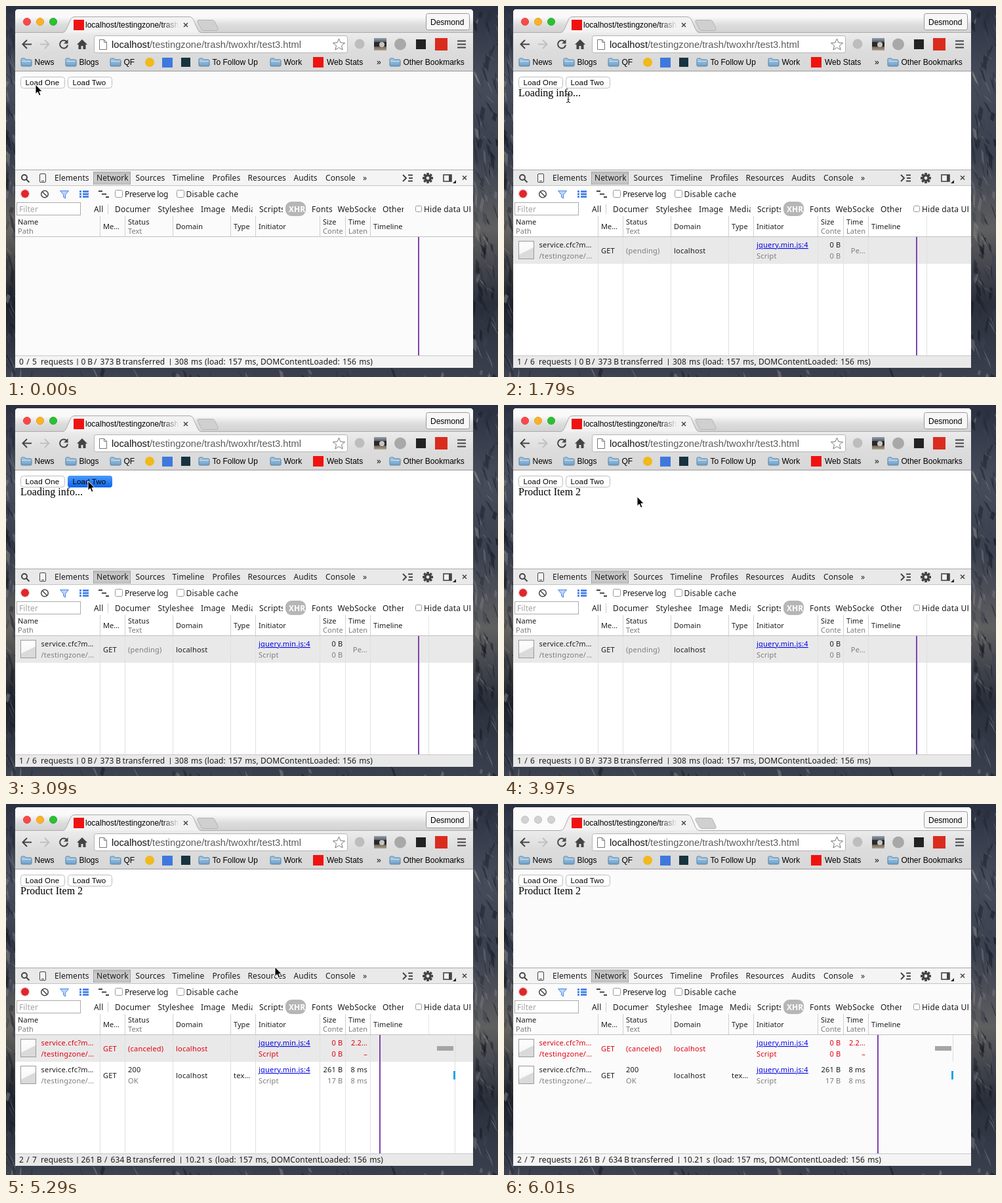
Recreate the animation shown at these times as an HTML page. Size 750x567 px, loop 6.11 s.

```html
<!DOCTYPE html>
<html lang="en">
<head>
<meta charset="utf-8">
<title>Network panel</title>
<style>
html, body { margin: 0; width: 100%; height: 100%; overflow: hidden; background: #2c313d; }
svg { display: block; }
#stage { width: 750px; height: 567px; --page: #fff; --bar: #e9e9e9; }
#stage.pale { --page: #fbfbfb; --bar: #f4f4f4; }
.page { fill: var(--page); }
.bar { fill: var(--bar); }
.title { fill: url(#title); }
.pale .vivid { display: none; }
.idle .title { fill: #fbfbfb; }
.idle .light { fill: #d2d2d2; stroke: #b9b9b9; }
text { white-space: pre; fill: #1c1c1c; }
.ui { font: 12px "Liberation Sans", Arial, sans-serif; fill: #000; }
.url { font: 14.7px "Liberation Sans", Arial, sans-serif; fill: #5c5c5c; }
.btn { font: 11.6px "Liberation Sans", Arial, sans-serif; letter-spacing: .1px; fill: #000; }
.body { font: 16px "Liberation Serif", Times, serif; fill: #000; }
.tool { font: 12px "Noto Sans", sans-serif; letter-spacing: .08px; }
.filter { font: 12px "Noto Sans", sans-serif; letter-spacing: .2px; }
.tight { letter-spacing: -.32px; }
.wide { letter-spacing: .2px; }
.hint { fill: #a4a4a4; }
.chosen { fill: #fff; font-weight: 600; }
.stat { font: 12px "Noto Sans", sans-serif; letter-spacing: .1px; word-spacing: 1px; }
.stat.close { word-spacing: -.4px; }
.cell { font: 11px "Noto Sans", sans-serif; letter-spacing: .22px; }
.head { font: 11px "Noto Sans", sans-serif; letter-spacing: .05px; }
.dim { fill: #7c7c7c; }
.red text { fill: #e0000f; }
text.link { fill: #0000e6; text-decoration: underline; }
.end { text-anchor: end; }
.line { fill: none; stroke: #444; stroke-width: 2; }
.thin { stroke-width: 1.5; }
.faint { stroke: #c0c0c0; }
</style>
</head>
<body>
<svg id="stage" viewBox="0 0 750 567" xmlns="http://www.w3.org/2000/svg"></svg>
<script>
const text = (x, y, s, cls) => `<text x="${x}" y="${y}" class="${cls}">${s}</text>`;
const rect = (x, y, w, h, fill, more = '') =>
  `<rect x="${x}" y="${y}" width="${w}" height="${h}" fill="${fill}" ${more}/>`;
const area = (x, y, w, h, cls) => `<rect x="${x}" y="${y}" width="${w}" height="${h}" class="${cls}"/>`;
const circle = (x, y, r, fill, more = '') => `<circle cx="${x}" cy="${y}" r="${r}" fill="${fill}" ${more}/>`;
const shape = (d, fill, stroke = 'none') => `<path d="${d}" fill="${fill}" stroke="${stroke}"/>`;
const line = (d, cls = '') => `<path d="${d}" class="line ${cls}"/>`;
const clipped = (x, y, w, s, cls) =>
  `<svg x="${x}" y="${y - 14}" width="${w}" height="20">${text(0, 14, s, cls)}</svg>`;
const group = (id, inner, cls = '') => `<g id="${id}" class="${cls}">${inner}</g>`;
const fade = (id, ...colors) => `<linearGradient id="${id}" x2="0" y2="1">${colors.map((c, i) =>
  `<stop offset="${i / (colors.length - 1)}" stop-color="${c}"/>`).join('')}</linearGradient>`;

const defs = `<defs>
  ${fade('leftRock', '#2a3040', '#4a505e', '#343a49', '#66645f', '#1d212b', '#3d4350')}
  ${fade('rightRock', '#2a3040', '#464c5a', '#3a404e', '#5f5f60', '#2a2f3b', '#3a404d')}
  ${fade('title', '#fbfbfb', '#f8f8f8', '#dcdcdc', '#d2d2d2')}
  ${fade('toolbar', '#ebebeb', '#dcdcdc', '#d8d8d8')}
  ${fade('folder', '#a9cdea', '#6f9fc8')}
  ${fade('pressed', '#4b9cfb', '#0b63ea')}
  ${fade('photo', '#8fa0b4', '#3c3a37', '#b0a490')}
  ${fade('sheet', '#fff', '#f2f2f2')}
  ${fade('tab', '#b4b4b4', '#cacaca', '#cdcdcd', '#bcbcbc')}
  <linearGradient id="fadeOut"><stop stop-color="#f2f2f2" stop-opacity="0"/><stop offset="1" stop-color="#f2f2f2"/></linearGradient>
</defs>`;

// Rocky wallpaper: soft gradients with seeded facets along the visible edges.
function wallpaper() {
  let seed = 11;
  const rnd = n => (seed = (seed * 16807) % 2147483647) / 2147483647 * n;
  const tones = ['#0f131b', '#181d28', '#262c3a', '#3b4150', '#757a86', '#8c8a86'];
  let out = rect(0, 0, 375, 567, 'url(#leftRock)') + rect(375, 0, 375, 567, 'url(#rightRock)');
  for (let i = 0; i < 320; i++) {
    const side = i % 6;
    const x = side < 2 ? rnd(18) - 5 : side < 5 ? 708 + rnd(42) : rnd(750);
    const y = side < 5 ? rnd(567) : 552 + rnd(14);
    const w = 1 + rnd(5), h = 6 + rnd(18), lean = rnd(14) - 4;
    const tone = tones[Math.floor(rnd(tones.length))];
    out += `<g opacity=".5">${shape(`M${x} ${y}l${w} ${h * .3}l${lean} ${h}l${-w} ${-h * .4}z`, tone)}</g>`;
  }
  return out;
}

const folder = x => shape(`M${x} 81.5q0-1.5 1.5-1.5h4l1.5 2h7.5q1.5 0 1.5 1.5v7q0 1.5-1.5 1.5h-13q-1.5 0-1.5-1.5z`,
  'url(#folder)', '#55809f') + rect(x + 1, 84, 14, 1, '#c9e0f2');

function browser() {
  const lights = [[32, '#fb4948', '#d93a38'], [52, '#fdb225', '#dc951d'], [72, '#29c231', '#1ea126']]
    .map(([x, f, s]) => circle(x, 24, 5.6, f, `class="light" stroke="${s}" stroke-width=".8"`)).join('');
  const marks = [[23, 'News'], [91, 'Blogs'], [159, 'QF'], [294, 'To Follow Up'], [403, 'Work'], [585, 'Other Bookmarks']]
    .map(([x, s]) => folder(x) + text(x + 20.5, 90, s, 'ui')).join('');
  return `<path class="page" d="M14 553V10q0-5 5-5H707q5 0 5 5V553z"/>`
    + '<path class="title" d="M14 41V10q0-5 5-5H707q5 0 5 5V41z"/>'
    + lights
    + rect(14, 41, 698, 58, 'url(#toolbar)')
    + shape('M14 40.5H86q4 0 6-5l6-14q2-5 7-5H279q5 0 7 5l6 14q2 5 6 5H712', '#f2f2f2', '#aaa')
    + rect(89, 40, 206, 2, '#eee')
    + shape('M294 21.5h20q3 0 4 2l5 11q1 3-2 3h-19q-3 0-4-2l-6-11q-1-3 2-3z', '#d0d0d0', '#b4b4b4')
    + rect(103, 21, 16, 16, '#ee1310')
    + clipped(121, 33, 143, 'localhost/testingzone/trash', 'ui') + rect(238, 20, 26, 18, 'url(#fadeOut)')
    + line('M271 26l6 6m0-6l-6 6', 'thin')
    + rect(640.5, 11.5, 66, 25, '#f7f7f7', 'rx="3" stroke="#999"')
    + text(647, 29, 'Desmond', 'ui')
    + line('M39 58.5H25m7-6.5l-6.5 6.5l6.5 6.5')
    + line('M52 58.5H66m-7-6.5l6.5 6.5l-6.5 6.5', 'faint')
    + line('M92.5 54.5a6 6 0 1 0 1.5 5') + shape('M94.5 51v6.5h-6.5z', '#444')
    + shape('M108 59l8-8l8 8h-2.5v7h-4v-5h-3v5h-4v-7z', '#444')
    + rect(134.5, 45.5, 386, 26, '#fff', 'rx="3" stroke="#b4b4b4"')
    + shape('M142.5 51.5h7l4 4v11h-11zM149.5 51.5v4h4', '#fff', '#777')
    + text(161, 64, '<tspan fill="#111">localhost</tspan>/testingzone/trash/twoxhr/test3.html', 'url')
    + shape('M507.5 50l2.5 6l6.500.5l-5 4.2l1.6 6.3l-5.6-3.5l-5.6 3.5l1.6-6.3l-5-4.2l6.5-.5z', '#fff', '#777')
    + circle(539, 58, 7.5, '#bdbdbd')
    + rect(561, 49, 19, 19, 'url(#photo)') + rect(561, 55, 19, 7, '#29292b') + circle(573, 59, 4, '#c9c3ba')
    + circle(601, 58.5, 9, '#a8a8a8')
    + rect(625, 51, 15, 15, '#222')
    + rect(654, 49, 19, 19, '#d92c1f')
    + line('M688 53.5h13m-13 5h13m-13 5h13')
    + marks
    + circle(219, 86, 7, '#f0b91c')
    + rect(238, 79, 16, 15, '#3f78dd')
    + rect(267, 79, 14, 14, '#173340')
    + rect(468, 78, 16, 16, '#ee1310') + text(489, 90, 'Web Stats', 'ui')
    + text(565, 90, '»', 'ui')
    + area(14, 99, 698, 454, 'page') + rect(14, 99, 698, 1, '#999');
}

const button = (x, label, id) =>
  rect(x + .5, 108.5, 67, 17, '#fff', 'rx="4" stroke="#bdbdbd"')
  + group(id, rect(x, 108, 68, 18, 'url(#pressed)', 'rx="4"'))
  + text(x + 7.5, 121, label, 'btn');

const checkbox = (x, y, size) => rect(x + .5, y + .5, size, size, '#fff', 'rx="2" stroke="#999"');

const columns = [143, 181, 254, 342, 380, 478, 517, 555];

function devtools() {
  const tabs = [[74, 'Elements'], [138, 'Network'], [197.5, 'Sources'], [253.5, 'Timeline'], [314.5, 'Profiles'],
    [368.5, 'Resources'], [438.5, 'Audits'], [487, 'Console'], [544, '»']];
  const filters = [[134, 20, 'All'], [166, 54, 'Document'], [231.5, 54, 'Stylesheets'], [297, 37, 'Images'],
    [344, 32, 'Media'], [386, 36, 'Scripts'], [466, 31, 'Fonts'], [505.5, 58, 'WebSockets'], [574, 32, 'Other'],
    [637, 71, 'Hide data URLs']];
  const gear = Array.from({ length: 8 }, (_, i) =>
    rect(641.4, 255, 3.2, 16, '#444', `transform="rotate(${i * 45} 643 263)"`)).join('');
  return area(14, 250, 698, 25, 'bar') + rect(14, 250, 698, 1, '#a8a8a8') + rect(14, 274, 698, 1, '#c4c4c4')
    + rect(133, 253, 57, 20, 'url(#tab)') + rect(133, 253, 1, 20, '#a0a0a0') + rect(189, 253, 1, 20, '#a0a0a0')
    + tabs.map(([x, s]) => text(x, 267, s, 'tool')).join('')
    + circle(28, 262, 4, 'none', 'class="line"') + line('M31 265l4.5 4.5')
    + rect(51.5, 256.5, 9, 13, '#f4f4f4', 'rx="1.5" stroke="#444"') + rect(54, 267, 4, 1, '#444')
    + line('M605 258l5 5l-5 5m8-9.5h7m-6 4.5h6m-7 4.5h7')
    + gear + circle(643, 263, 5.8, '#444') + circle(643, 263, 2.4, '#e9e9e9')
    + rect(667, 258, 12, 10, '#f4f4f4', 'stroke="#444" stroke-width="1.6"') + rect(675, 258, 4, 10, '#444')
    + shape('M686 266v5h-5z', '#222')
    + line('M696 259.5l6 6m0-6l-6 6', 'thin')
    + circle(29, 287, 6, '#e0262b') + circle(29, 287, 6.6, 'none', 'stroke="#efa5a5" stroke-width=".7"')
    + circle(59, 287.5, 5.3, 'none', 'class="line thin"') + line('M55.5 284l7 7', 'thin')
    + shape('M82.5 282.5h13l-5 6v5.5l-3-2v-3.5z', '#b9d4fa', '#4b86e8')
    + [282, 286, 290].map(y => rect(112, y, 3, 3, '#4b86e8') + rect(117, y, 9, 3, '#4b86e8')).join('')
    + line('M141 283h6m-1 4.5h7m-1 4.5h5')
    + checkbox(166, 281, 11) + text(181, 292, 'Preserve log', 'tool tight')
    + checkbox(260, 281, 11) + text(274.5, 292, 'Disable cache', 'tool wide')
    + rect(16.5, 300.5, 97, 19, '#fff', 'stroke="#aaa"') + text(20, 315, 'Filter', 'tool hint')
    + rect(155, 303, 1, 15, '#ccc')
    + rect(426, 299, 31, 22, '#b6b6b6', 'rx="9"')
    + clipped(431, 315, 25, 'XHR', 'tool chosen')
    + checkbox(624, 305, 9)
    + filters.map(([x, w, s]) => clipped(x, 315, w, s, 'filter')).join('')
    + columns.map(x => rect(x, 321, 1, 31, '#d0d0d0')).join('')
    + `<g class="vivid">${rect(644, 321, 1, 31, '#e4e4e4')}</g>`
    + rect(14, 352, 698, 1, '#c0c0c0')
    + [[18, 'Name', 'Path'], [186, 'Status', 'Text'], [483, 'Size', 'Content'], [522, 'Time', 'Latency']]
      .map(([x, a, b]) => clipped(x, 334, 34, a, 'head') + clipped(x, 348, 30, b, 'head dim')).join('')
    + [[148, 'Me…'], [259, 'Domain'], [347, 'Type'], [385, 'Initiator'], [560, 'Timeline']]
      .map(([x, s]) => text(x, 341, s, 'head')).join('')
    + group('stripe', rect(14, 353, 698, 41, '#e9e9e9'), 'vivid')
    + `<g class="vivid">${columns.map(x => rect(x, 353, 1, 181, '#e0e0e0')).join('')}</g>`
    + area(14, 534, 698, 19, 'bar') + rect(14, 534, 698, 1, '#c8c8c8');
}

// A request row; cells given two values stack them, the lower one dimmed.
function row(y, cls, { status, time, size, type = '' }) {
  const cell = (x, [top, bottom], extra = '') => bottom
    ? text(x, y + 16, top, `cell ${extra}`) + text(x, y + 33, bottom, `cell dim ${extra}`)
    : text(x, y + 25, top, `cell ${extra}`);
  return `<g class="${cls}">` + rect(22.5, y + 6.5, 23, 27, 'url(#sheet)', 'stroke="#999"')
    + shape(`M23 ${y + 27}L45 ${y + 16}V${y + 33}H23z`, '#dadada')
    + cell(53.5, ['service.cfc?m…', '/testingzone/…'])
    + cell(148, ['GET'])
    + cell(186, status, status[1] ? '' : 'dim')
    + cell(259, ['localhost'])
    + cell(347, [type])
    + text(385, y + 33, 'Script', 'cell dim')
    + cell(513.5, size, 'end')
    + cell(551, time, time[1] ? 'end' : 'dim end')
    + '</g>' + text(385, y + 16, 'jquery.min.js:4', 'cell link');
}

const timeline = (mark, grid) =>
  `<g class="vivid">${rect(grid, 353, 1, 181, '#e0e0e0')}</g>` + rect(mark, 353, 2, 181, '#7d43ab');

const status = (count, sent, tail, shift) =>
  text(20, 548, count, 'stat') + text(53, 548, 'requests', 'stat')
  + sent.map(([x, s]) => text(x, 548, s, 'stat close')).join('')
  + [[177.5, 'transferred'], [257, tail], [303, '(load: 157 ms,'], [388, 'DOMContentLoaded: 156 ms)']]
    .map(([x, s]) => text(x + shift, 548, s, 'stat')).join('')
  + rect(108.5, 539, 1, 10, '#333') + rect(250 + shift, 539, 1, 10, '#333');

const early = [[114.5, '0 B'], [134, '/'], [143.5, '373 B']];
const late = [[114.5, '261 B'], [150, '/'], [159.5, '634 B']];
const states =
  group('empty', timeline(628, 644) + status('0 / 5', early, '308 ms', 0))
  + group('pending', timeline(628, 644) + status('1 / 6', early, '308 ms', 0)
    + row(353, '', { status: ['(pending)'], size: ['0 B', '0 B'], time: ['Pe…'] }))
  + group('done', timeline(569, 684) + rect(684, 353, 1, 41, '#ddd')
    + rect(657, 370, 25, 7, '#a5a5a5') + rect(682, 408, 3, 13, '#18a3e6')
    + status('2 / 7', late, '10.21 s', 16)
    + row(353, 'red', { status: ['(canceled)'], size: ['0 B', '0 B'], time: ['2.2…', '–'] })
    + row(394, '', { status: ['200', 'OK'], size: ['261 B', '17 B'], time: ['8 ms', '8 ms'], type: 'tex…' }));

const pointer = group('cursor',
  group('arrow', shape('M0 0V14.5L3.3 11.5L5.5 17L8 16L5.8 10.7H10.3z', '#000', '#fff'))
  + group('beam', shape('M-3-6.5q3 0 3 2q0-2 3-2M0-4.5V4.5M-3 6.5q3 0 3-2q0 2 3 2M-1.5 2h3', 'none', '#111')));

const stage = document.getElementById('stage');
stage.innerHTML = defs + wallpaper() + browser()
  + button(22, 'Load One', 'pressOne') + button(94, 'Load Two', 'pressTwo')
  + group('loading', text(22, 138, 'Loading info...', 'body'))
  + group('product', text(22, 138, 'Product Item 2', 'body'))
  + devtools() + states + pointer;

const LOOP = 6110;
const moves = [
  [0, 45, 120], [60, 45, 119], [230, 45, 118],
  [1670, 58, 124], [1730, 78, 134], [1790, 98, 141], [1850, 112, 143], [1900, 121, 140], [1960, 126, 134],
  [2020, 128, 128], [2080, 128, 122], [2130, 127, 119], [2190, 126, 118], [2490, 126, 117], [2610, 125, 116],
  [3740, 131, 118], [3800, 146, 123], [3850, 168, 131], [3910, 190, 137], [3970, 203, 140], [4030, 207, 142],
  [4750, 222, 150], [4810, 268, 174], [4870, 332, 210], [4930, 386, 238], [5050, 408, 248],
  [5290, 410, 249], [5350, 430, 272], [5410, 485, 320], [5470, 555, 380], [5530, 620, 436],
  [5590, 672, 486], [5650, 710, 526], [5710, 732, 550], [5770, 770, 600],
];
const spans = {
  pressOne: [950, 1250], pressTwo: [3090, 3510],
  loading: [1250, 3560], product: [3560, LOOP],
  empty: [0, 1670], pending: [1670, 4030], done: [4030, LOOP], stripe: [1670, LOOP],
  beam: [1730, 1850],
};
const parts = Object.fromEntries([...Object.keys(spans), 'arrow', 'cursor']
  .map(id => [id, document.getElementById(id)]));
const show = (id, on) => { parts[id].style.display = on ? '' : 'none'; };

function draw(t) {
  for (const id in spans) show(id, t >= spans[id][0] && t < spans[id][1]);
  show('arrow', t < spans.beam[0] || t >= spans.beam[1]);
  const [, x, y] = moves.findLast(m => m[0] <= t);
  parts.cursor.setAttribute('transform', `translate(${x} ${y})`);
  stage.classList.toggle('pale', t < 950 || t >= 6010);
  stage.classList.toggle('idle', t >= 6010);
}

const start = performance.now();
function tick() {
  draw((performance.now() - start) % LOOP);
  requestAnimationFrame(tick);
}
tick();
</script>
</body>
</html>
```
